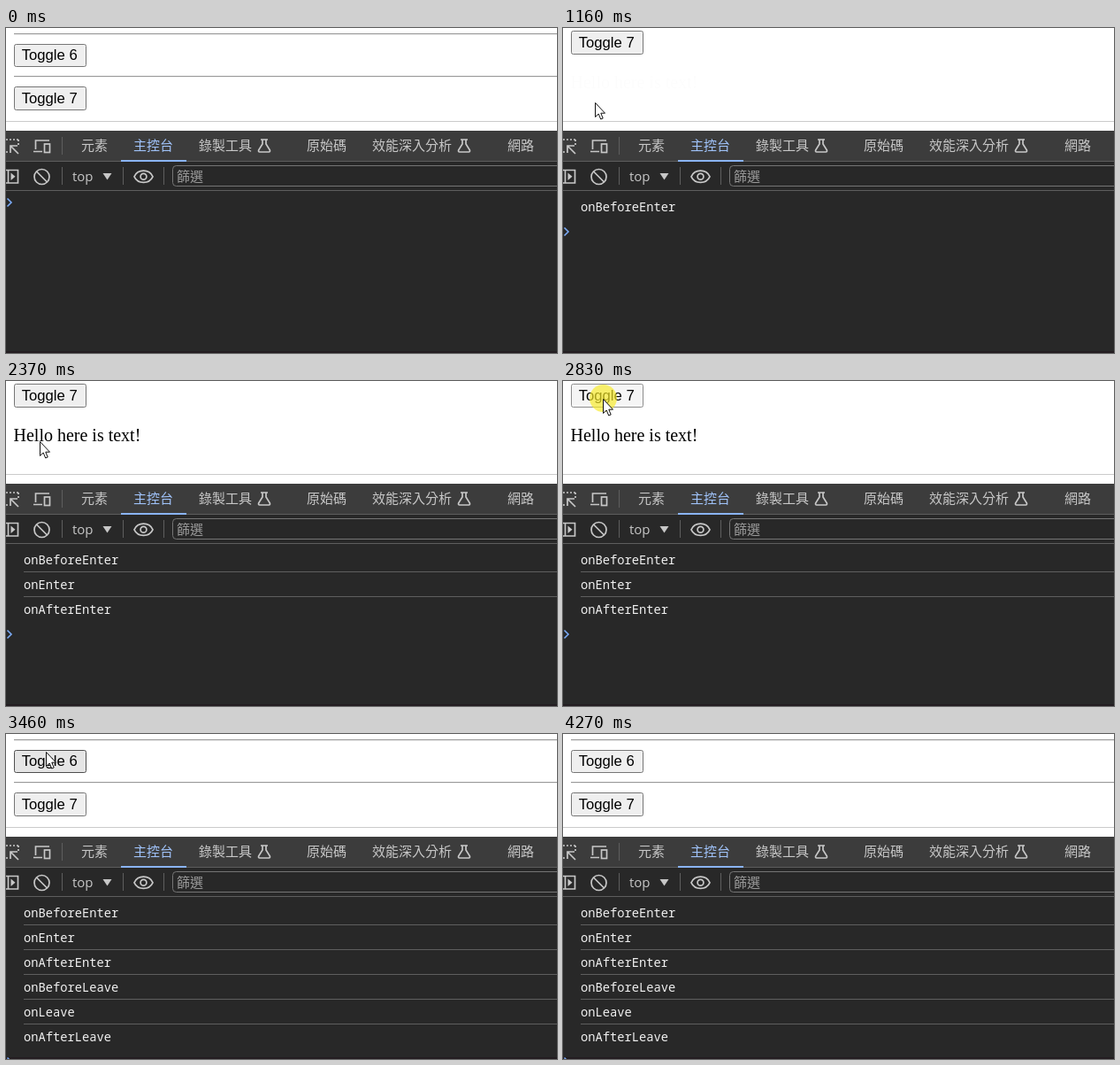
An HTML page for the animation above (4690 ms loop, 623 by 367 pixels).

```html
<!DOCTYPE html>
<html lang="zh-Hant">
<head>
<meta charset="utf-8">
<title>Toggle transition hooks</title>
<style>
  html, body { margin: 0; width: 100%; height: 100%; overflow: hidden; background: #fff; }
  svg { display: block; }
  .button rect { fill: #efefef; stroke: #767676; }
  .button text { font: 16.67px "Liberation Sans", Arial, sans-serif; }
  .button.hover rect { fill: #e5e5e5; stroke: #4f4f4f; }
  .button.active rect { fill: #f5f5f5; stroke: #8d8d8d; }
  #hello { font: 20px "Liberation Serif", "Times New Roman", serif; }
  .ui { font: 15px "Noto Sans CJK TC", "Noto Sans CJK", "Noto Sans", sans-serif; fill: #c7c7c7; }
  .latin { font-family: "Open Sans", "Noto Sans", sans-serif; }
  .icon { fill: none; stroke: #c7c7c7; stroke-width: 1.7; }
  .solid { fill: #c7c7c7; stroke: none; }
  .log text { font: 13.75px "Noto Sans Mono", "DejaVu Sans Mono", monospace; fill: #f1f1f1; }
  .log path { stroke: #5e5e5e; }
</style>
</head>
<body>
<svg width="623" height="367" viewBox="0 0 623 367">
  <defs>
    <clipPath id="viewport"><rect width="623" height="105"/></clipPath>
    <path id="flask" d="M-4-7H4M-2-7V-2L-6.3 4.8Q-7 7-5.2 7H5.2Q7 7 6.3 4.8L2-2V-7"/>
    <g id="rule">
      <rect x="9" width="614" height="1" fill="#9a9a9a"/>
      <rect x="9" y="1" width="614" height="1" fill="#eee"/>
    </g>
  </defs>

  <rect width="623" height="367" fill="#fff"/>
  <g clip-path="url(#viewport)">
    <g id="page">
      <use href="#rule" y="6"/>
      <g class="button" data-top="18">
        <rect x="9.5" y="18.5" width="81" height="25" rx="2"/><text x="17.7" y="36">Toggle 6</text>
      </g>
      <use href="#rule" y="54"/>
      <g class="button" data-top="66">
        <rect x="9.5" y="66.5" width="81" height="26" rx="2"/><text x="17.7" y="85">Toggle 7</text>
      </g>
      <text id="hello" x="8.5" y="131">Hello here is text!</text>
    </g>
  </g>
  <rect y="105" width="623" height="1" fill="#cbcbcb"/>

  <rect y="116" width="623" height="35" fill="#3c3c3c"/>
  <rect y="151" width="623" height="216" fill="#282828"/>
  <path d="M0 150.5H623M0 183.5H623" stroke="#5e5e5e"/>
  <rect x="130" y="149" width="74" height="2" fill="#8ab4f8"/>
  <rect y="365" width="623" height="2" fill="#231d20"/>
  <path d="M63.5 123V143M63.5 157V177M132.5 157V177M178.5 157V177" stroke="#5e5e5e"/>

  <g class="ui">
    <text x="85" y="138">元素</text>
    <text x="144" y="138" fill="#a0c3fa">主控台</text>
    <text x="218" y="138">錄製工具</text>
    <text x="340" y="138">原始碼</text>
    <text x="414" y="138">效能深入分析</text>
    <text x="567" y="138">網路</text>
    <text class="latin" x="75" y="173">top</text>
  </g>

  <g class="icon">
    <use href="#flask" x="292" y="133"/>
    <use href="#flask" x="518" y="133"/>
    <path d="M0 126H15" stroke-dasharray="2 2"/>
    <path d="M14 126V133M0 140H3" stroke-dasharray="2 2"/>
    <path d="M14 142L5.5 133.5M5 141V133H13"/>
    <path d="M33.5 137V127H49M31 139.5H41"/>
    <rect x="43.5" y="131" width="6" height="9.5"/>
    <path d="M0 160.5H13.5V175H0M2.5 160V175"/>
    <path class="solid" d="M5.5 163.5L10.5 167.8L5.5 172Z"/>
    <circle cx="40.5" cy="168" r="8.5"/><path d="M34.5 162L46.5 174"/>
    <path class="solid" d="M109.5 164H119.5L114.5 171.5Z"/>
    <path d="M145 167.8C149 159 162 159 166 167.8C162 176.5 149 176.5 145 167.8Z"/>
    <circle cx="155.5" cy="167.8" r="3.4"/>
  </g>
  <rect x="188.5" y="155.5" width="450" height="23" rx="4" fill="#282828" stroke="#757575"/>
  <text class="ui" x="193" y="173" style="fill:#9a9a9a">篩選</text>

  <g id="console"></g>
  <path id="prompt" d="M1.5-4.5L6 0L1.5 4.5" fill="none" stroke="#7cacf8" stroke-width="1.6"/>

  <g id="pointer">
    <circle id="press" cx="0.5" cy="-0.5" r="15.5" fill="#f7ea28" opacity="0.68"/>
    <path d="M.5.5V16.5L4.2 13L6.7 19L9.2 18L6.8 12.2H11.5Z" fill="#fff" stroke="#111"/>
  </g>
</svg>

<script>
const LOOP = 4690;
const ROW = 28;
const SCROLL = 63;
const ENTER = 1160, LEAVE = 2900, REMOVED = 3460;
const LOGS = [
  ["onBeforeEnter", ENTER], ["onEnter", 1230], ["onAfterEnter", 1710],
  ["onBeforeLeave", LEAVE], ["onLeave", LEAVE], ["onAfterLeave", REMOVED]
];
const byId = id => document.getElementById(id);
const show = (el, on) => { el.style.display = on ? "" : "none"; };
const clamp = x => Math.min(1, Math.max(0, x));
const within = (t, start, end) => t >= start && t < end;

const logRows = LOGS.map(([label], i) => {
  const row = document.createElementNS("http://www.w3.org/2000/svg", "g");
  const line = i ? `<path d="M20 ${187.5 + ROW * i}H623"/>` : "";
  row.setAttribute("class", "log");
  row.innerHTML = `${line}<text x="20" y="${207 + ROW * i}">${label}</text>`;
  byId("console").append(row);
  return row;
});
const buttons = [...document.querySelectorAll(".button")];

// Number of picture changes made so far, out of count spread over start..end.
const changes = (t, start, end, count) =>
  t < start ? 0 : Math.min(count, Math.floor((t - start) / (end - start) * (count - 1) + 1e-6) + 1);

const mix = (a, b, p) => a.map((v, i) => Math.round(v + (b[i] - v) * p));

function pointerAt(t) {
  if (t < 200 || t >= 4270) return null;
  if (t < 830) {
    const p = (changes(t, 200, 700, 8) - 1) / 7;
    return mix([412, 251], [36, 87], 1 - (1 - p) ** 3);
  }
  if (t < 2310) return mix([36, 87], [36, 84], changes(t, 830, 900, 2) / 2);
  if (t < 3790) return mix([36, 84], [45, 20], changes(t, 2310, 2500, 4) / 4);
  return mix([45, 20], [712, 430], (changes(t, 3790, 4270, 8) / 8) ** 2);
}

// Half-second CSS-like ease, sampled every 70 ms.
function fade(t, start) {
  const sampled = Math.floor((t - start) / 70) * 70 + 14;
  const p = 1 - (1 - clamp(sampled / 500)) ** 1.9;
  return p * p * (3 - 2 * p);
}

function render(t) {
  const open = within(t, ENTER, REMOVED);
  const scroll = open ? SCROLL : 0;
  byId("page").setAttribute("transform", `translate(0 ${-scroll})`);
  byId("hello").style.opacity = open ? (t < LEAVE ? fade(t, ENTER) : 1 - fade(t, LEAVE)) : 0;

  const count = LOGS.filter(([, time]) => t >= time).length;
  logRows.forEach((row, i) => show(row, i < count));
  byId("prompt").setAttribute("transform", `translate(0 ${count ? 202 + ROW * count : 197})`);

  const tip = pointerAt(t);
  const pressed = within(t, 1040, ENTER) || within(t, 2830, LEAVE);
  show(byId("pointer"), tip);
  show(byId("press"), pressed);
  if (tip) byId("pointer").setAttribute("transform", `translate(${tip})`);
  for (const button of buttons) {
    const top = button.dataset.top - scroll;
    const over = !!tip && within(tip[0], 9, 91) && within(tip[1], top, top + 27);
    button.classList.toggle("hover", over);
    button.classList.toggle("active", over && pressed);
  }
}

const began = performance.now();
function tick() {
  render((performance.now() - began) % LOOP);
  requestAnimationFrame(tick);
}
tick();
</script>
</body>
</html>
```
